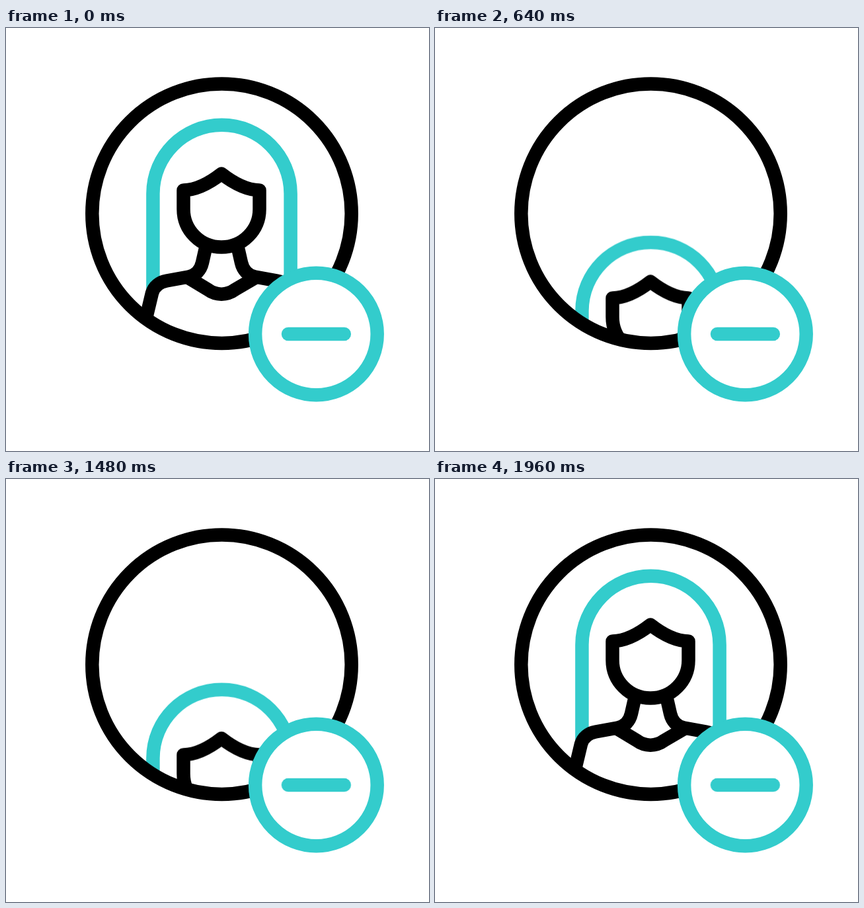
Recreate the animation shown at these times as an HTML page. Size 640 by 640 pixels, loop 2 s.

```html
<!DOCTYPE html>
<html lang="en">
<head>
<meta charset="utf-8">
<title>Remove user</title>
<style>
  html, body { margin: 0; width: 100%; height: 100%; overflow: hidden; background: #fff; }
  svg { display: block; width: 640px; height: 640px; }
  path, circle, line {
    fill: none; stroke: #000; stroke-width: 20.5;
    stroke-linecap: round; stroke-linejoin: round;
  }
  .teal { stroke: #33cccc; }
  .white { fill: #fff; }
  .badge * { vector-effect: non-scaling-stroke; }

  .hair, .head, .body, .badge, .arch, .minus { animation: 2s linear infinite; }
  .hair { animation-name: hair; }
  .head { animation-name: head; }
  .body { animation-name: body; }
  .arch { animation-name: stretch; }
  .badge { animation-name: press; transform-origin: 469.4px 463px; }
  .minus { animation-name: spin; transform-origin: 469.4px 463px; }

  /* lift, drop out of the ring, then rise back in as one */
  @keyframes hair {
    0%, 11% { transform: translateY(0); animation-timing-function: cubic-bezier(.333, 0, .667, 1); }
    20% { transform: translateY(-7.5px); animation-timing-function: cubic-bezier(.4, 0, .67, .36); }
    26% { transform: translateY(49.5px); }
    32% { transform: translateY(176.5px); }
    40% { transform: translateY(346px); }
    56% { transform: translateY(341px); }
    84% { transform: translateY(78.5px); animation-timing-function: cubic-bezier(.33, .55, .6, 1); }
    98%, 100% { transform: translateY(0); }
  }
  @keyframes head {
    0%, 8% { transform: translateY(0); animation-timing-function: cubic-bezier(.333, 0, .667, 1); }
    20% { transform: translateY(-14.5px); animation-timing-function: cubic-bezier(.4, 0, .67, .36); }
    26% { transform: translateY(34px); }
    32% { transform: translateY(162px); }
    40% { transform: translateY(346px); }
    56% { transform: translateY(341px); }
    84% { transform: translateY(78.5px); animation-timing-function: cubic-bezier(.33, .55, .6, 1); }
    98%, 100% { transform: translateY(0); }
  }
  @keyframes body {
    0%, 8% { transform: translateY(0); animation-timing-function: cubic-bezier(.333, 0, .667, 1); }
    20% { transform: translateY(-13px); animation-timing-function: cubic-bezier(.4, 0, .67, .36); }
    26% { transform: translateY(39px); }
    32% { transform: translateY(166px); }
    40% { transform: translateY(346px); }
    56% { transform: translateY(341px); }
    84% { transform: translateY(78.5px); animation-timing-function: cubic-bezier(.33, .55, .6, 1); }
    98%, 100% { transform: translateY(0); }
  }
  @keyframes stretch {
    0%, 20%, 32%, 100% { d: path("M222.4 700V250.7C222.4 193.2 269 146.7 326.5 146.7S430.6 193.2 430.6 250.7V700"); }
    26% { d: path("M222.4 700V259C222.4 197 269 146.7 326.5 146.7S430.6 197 430.6 259V700"); }
  }
  @keyframes press {
    0%, 5% { transform: none; animation-timing-function: cubic-bezier(.333, 0, .667, 1); }
    15% { transform: translate(-.4px, .4px) scale(.942); animation-timing-function: cubic-bezier(.333, 0, .667, 1); }
    25%, 100% { transform: none; }
  }
  @keyframes spin {
    0%, 57% { transform: rotate(0deg); animation-timing-function: cubic-bezier(.333, 0, .667, 1); }
    74%, 100% { transform: rotate(180deg); }
  }
</style>
</head>
<body>
<svg viewBox="0 0 640 640">
  <clipPath id="port"><circle cx="326.5" cy="280.7" r="196"/></clipPath>

  <g clip-path="url(#port)">
    <g class="hair">
      <path class="arch teal" d="M222.4 700V250.7C222.4 193.2 269 146.7 326.5 146.7S430.6 193.2 430.6 250.7V700"/>
    </g>
    <g class="body">
      <path class="white" d="M204 472L221 401C224 391 232 384.5 243 382.5L276 376.5L305 395.5C318 405 334 405 347 395.5L376 376.5L410 382.5C421 384.5 429 391 432 401L449 472V700H204Z" style="stroke:none"/>
      <path d="M302 333L297 355C294.5 366 287 374.5 276 376.5L243 382.5C232 384.5 224 391 221 401L204 472"/>
      <path d="M351 333L356 355C358.500 366 366 374.500 377 376.500L410 382.500C421 384.500 429 391 432 401L449 472"/>
      <path d="M276 378L305 395.5C318 405 334 405 347 395.5L377 378"/>
    </g>
    <g class="head">
      <path class="white" d="M326 220.500C310 233 290 245 268.500 245.500V274C268.500 306 294 331.500 326 331.500S383.500 306 383.500 274V245.500C362 245 342 233 326 220.500Z"/>
    </g>
  </g>

  <circle cx="326.5" cy="280.7" r="196.2"/>

  <g class="badge">
    <circle class="teal white" cx="469.4" cy="463" r="92.300"/>
    <line class="minus teal" x1="427" y1="463" x2="511.800" y2="463"/>
  </g>
</svg>
</body>
</html>
```
